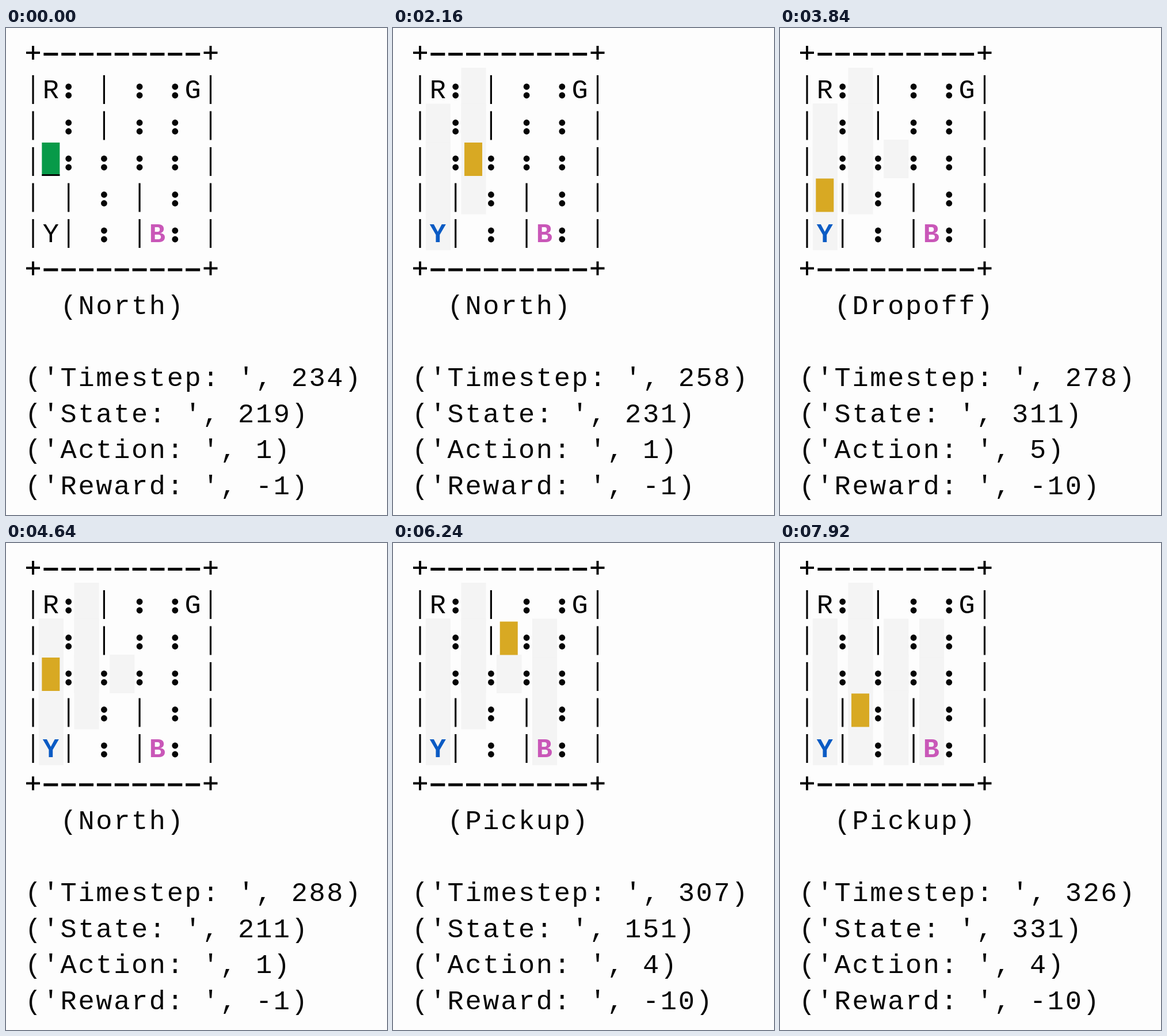
Animation of 662 by 846 pixels, one loop 8 s. Source, as an HTML page with a canvas:

```html
<!DOCTYPE html>
<html lang="en">
<head>
<meta charset="utf-8">
<title>Taxi grid world</title>
<style>
  html, body { margin: 0; width: 100%; height: 100%; overflow: hidden; background: #fdfdfd; }
  canvas { display: block; width: 662px; height: 846px; }
</style>
</head>
<body>
<canvas id="stage" width="662" height="846"></canvas>
<script>
const ctx = document.getElementById('stage').getContext('2d');
const TICK = 80, LOOP = 8000;
const LEFT = 47, TOP = 107, CHAR_W = 30.85, LINE_H = 62.5;
const INK = '#050505', PAPER = '#fdfdfd', TRAIL = '#f4f4f4';
const EMPTY = '#d8a923', FULL = '#079a49', BLUE = '#0b5bc4', PINK = '#c957b8';

const MAP = [
  '|R: | : :G|',
  '| : | : : |',
  '| : : : : |',
  '| | : | : |',
  '|Y| : |B: |'
];
const KEYS = 'SNEWPD';
const LABELS = ['South', 'North', 'East', 'West', 'Pickup', 'Dropoff'];

// One action per tick; a dot holds the picture.
const MOVES =
  '.SSDED.SWN' + 'ENNENNEPD.' + 'NSESSPNEDW' + 'WPWNPWDSP.' + 'SENWPSWDPW' +
  'EDNPWSDN.W' + 'PEEESSPDSW' + 'NNPNDPWP.D' + 'WSPSSEWWPD' + 'SNNDSWD.P';

function advance(s, key) {
  if (key === '.') return s;
  const n = { ...s, step: s.step + 1, action: KEYS.indexOf(key), reward: -1 };
  const open = i => MAP[s.row][i] === ':';
  if (key === 'S') n.row = Math.min(4, s.row + 1);
  if (key === 'N') n.row = Math.max(0, s.row - 1);
  if (key === 'E' && open(2 * s.col + 2)) n.col++;
  if (key === 'W' && open(2 * s.col)) n.col--;
  if (key === 'P') n.reward = -10;
  if (key === 'D') {
    if (s.full && MAP[s.row][2 * s.col + 1] === 'Y') n.full = false;
    else n.reward = -10;
  }
  if (n.row !== s.row || n.col !== s.col) n.trail = [...s.trail, [s.row, s.col]];
  return n;
}

const history = [{ step: 234, row: 2, col: 0, full: true, action: 1, reward: -1, trail: [] }];
for (const key of MOVES) history.push(advance(history[history.length - 1], key));

const stateId = s => ((s.row * 5 + s.col) * 5 + (s.full ? 4 : 2)) * 4 + 3;
const colX = i => LEFT + i * CHAR_W;
const rowY = r => TOP + r * LINE_H;

function rect(x, y, w, h, color) {
  ctx.fillStyle = color;
  ctx.fillRect(x, y, w, h);
}

function dot(x, y) {
  ctx.fillStyle = INK;
  ctx.beginPath();
  ctx.arc(x, y, 5.4, 0, 2 * Math.PI);
  ctx.fill();
}

function write(text, col, row, color = INK, weight = 'normal') {
  ctx.font = `${weight} 47px "Liberation Mono", monospace`;
  ctx.textAlign = 'center';
  ctx.textBaseline = 'alphabetic';
  ctx.fillStyle = color;
  [...text].forEach((c, i) => ctx.fillText(c, colX(col + i), rowY(row) + 15));
}

function border(y) {
  for (const x of [colX(0), colX(10)]) {
    rect(x - 12, y - 2, 24, 4, INK);
    rect(x - 2, y - 12, 4, 24, INK);
  }
  for (let i = 1; i < 10; i++) rect(colX(i) - 12.5, y, 25, 5, INK);
}

function drawTaxi(s) {
  const x = colX(2 * s.col + 1) - 15.5, y = rowY(s.row) - 33;
  rect(x, y, 31, 58, s.full ? FULL : EMPTY);
  if (s.full && MAP[s.row][2 * s.col + 1] === ' ') rect(x, y + 55, 31, 3, INK);
}

function drawMap(s) {
  border(43);
  border(417.5);
  MAP.forEach((line, r) => [...line].forEach((c, i) => {
    const x = colX(i), y = rowY(r);
    if (c === '|') rect(x - 1.6, y - 25, 3.2, 50, INK);
    else if (c === ':') { dot(x, y - 5); dot(x, y + 10); }
    else if (c === 'B') write(c, i, r, PINK, 'bold');
    else if (c === 'Y' && !s.full) write(c, i, r, BLUE, 'bold');
    else if (c !== ' ') write(c, i, r);
  }));
}

function draw(s) {
  rect(0, 0, 662, 846, PAPER);
  for (const [r, c] of s.trail) rect(colX(2 * c + 1) - 21, rowY(r) - 38, 43, 67, TRAIL);
  drawTaxi(s);
  drawMap(s);
  write(`(${LABELS[s.action]})`, 2, 6);
  write(`('Timestep: ', ${s.step})`, 0, 8);
  write(`('State: ', ${stateId(s)})`, 0, 9);
  write(`('Action: ', ${s.action})`, 0, 10);
  write(`('Reward: ', ${s.reward})`, 0, 11);
}

const start = performance.now();
function loop() {
  const t = Math.max(0, performance.now() - start) % LOOP;
  draw(history[Math.floor(t / TICK)]);
  requestAnimationFrame(loop);
}
loop();
</script>
</body>
</html>
```
